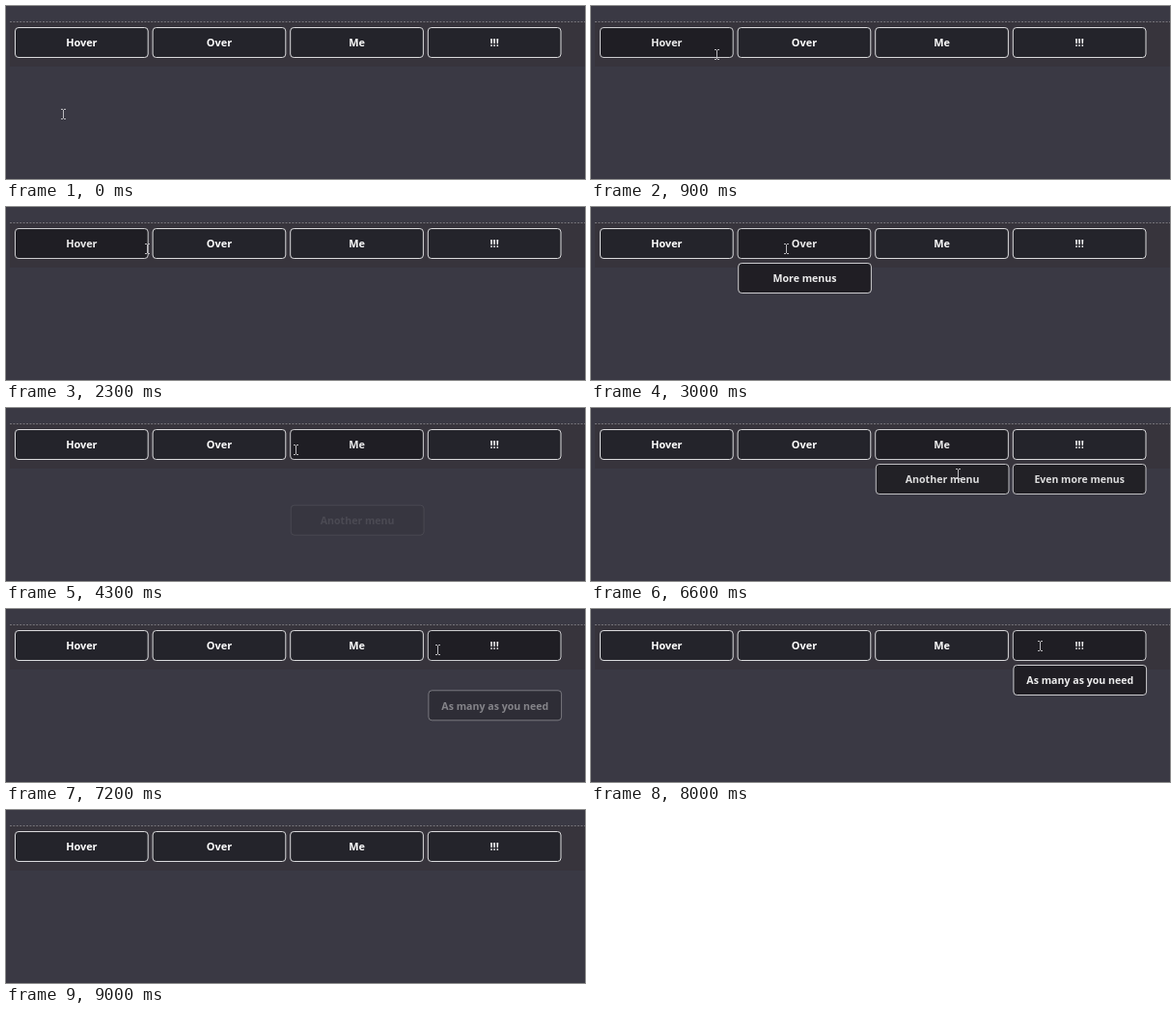
An HTML page with a canvas that plays this animation: 600x180 px, repeating every 9200 ms.

```html
<!DOCTYPE html>
<html lang="en">
<head>
<meta charset="utf-8">
<title>Hover menu</title>
<style>
  html, body { margin: 0; width: 600px; height: 180px; overflow: hidden; background: #3a3944; }
  canvas { display: block; width: 600px; height: 180px; }
</style>
</head>
<body>
<canvas id="stage" width="600" height="180"></canvas>
<script>
const ctx = document.getElementById('stage').getContext('2d');
const LOOP = 9200, STEP = 100, LEAVE = 8200;
const SLIDE = 48, SLIDE_MS = 500, HOVER_ALPHA = 0.92;
const LEFT = 9, PITCH = 142.6, BTN_W = 138.7, BTN_H = 32;
const TOP = 22, SUB_Y = 58, SUB_DX = 0.6;

const menus = [
  { label: 'Hover' },
  { label: 'Over', sub: 'More menus' },
  { label: 'Me', sub: 'Another menu', child: 'Even more menus' },
  { label: '!!!', sub: 'As many as you need' }
];
menus.forEach((m, i) => { m.x = LEFT + i * PITCH; });

// Cursor trips; it rests between them.
const start = { x: 59, y: 112 };
const moves = [
  { from: 0, to: 1000, x: 138, y: 43 },
  { from: 2200, to: 3000, x: 202, y: 43 },
  { from: 3400, to: 4650, x: 338, y: 43 },
  { from: 4900, to: 5200, x: 342, y: 51 },
  { from: 5200, to: 5900, x: 380, y: 68 },
  { from: 6600, to: 7150, x: 447, y: 42 },
  { from: 7200, to: 7500, x: 465, y: 38 },
  { from: 8100, to: LEAVE, x: 470, y: 19 }
];

function cursorAt(t) {
  let { x, y } = start;
  for (const m of moves) {
    if (t <= m.from) break;
    const p = Math.min(1, (t - m.from) / (m.to - m.from));
    x += (m.x - x) * p;
    y += (m.y - y) * p;
  }
  return { x, y };
}

// How long the cursor has been over a menu, or over its submenu only.
function hoverTime(menu, t, subOnly) {
  const top = subOnly ? SUB_Y - 2 : TOP;
  const bottom = menu.sub ? SUB_Y + BTN_H : TOP + BTN_H;
  const inside = s => {
    const { x, y } = cursorAt(s);
    return s < LEAVE && x >= menu.x && x < menu.x + BTN_W && y >= top && y < bottom;
  };
  let s = t;
  while (s > 0 && inside(s)) s -= 5;
  return t - s;
}

// cubic-bezier(.25, .1, .25, 1)
function ease(x) {
  if (x >= 1) return 1;
  const bez = (a, b, s) => 3 * a * s * (1 - s) ** 2 + 3 * b * s * s * (1 - s) + s ** 3;
  let lo = 0, hi = 1;
  for (let i = 0; i < 24; i++) {
    const mid = (lo + hi) / 2;
    if (bez(0.25, 0.25, mid) < x) lo = mid; else hi = mid;
  }
  return bez(0.1, 1, lo);
}

function button(label, x, y, alpha, hovered, size) {
  ctx.globalAlpha = alpha;
  ctx.beginPath();
  ctx.roundRect(x + 0.5, y + 0.5, BTN_W - 1, BTN_H - 1, 3.5);
  ctx.fillStyle = hovered ? '#1e1d22' : '#24242b';
  ctx.fill();
  ctx.strokeStyle = '#dcdcde';
  ctx.lineWidth = 1;
  ctx.stroke();
  ctx.fillStyle = '#fff';
  ctx.font = `bold ${size}px "Open Sans", "Noto Sans", sans-serif`;
  ctx.fillText(label, x + BTN_W / 2, y + 20.2);
  ctx.globalAlpha = 1;
}

function background() {
  ctx.fillStyle = '#3a3944';
  ctx.fillRect(0, 0, 600, 180);
  ctx.fillStyle = '#37343c';
  ctx.fillRect(4, 16, 596, 47);
  ctx.strokeStyle = '#77757b';
  ctx.lineWidth = 1;
  ctx.setLineDash([2, 1.4]);
  ctx.beginPath();
  ctx.moveTo(4, 16.5);
  ctx.lineTo(600, 16.5);
  ctx.stroke();
  ctx.setLineDash([]);
}

function drawMenu(m, t) {
  const held = hoverTime(m, t);
  button(m.label, m.x, TOP, held ? HOVER_ALPHA : 1, held > 0, 10.9);
  if (!held || !m.sub) return;
  const nested = m.child ? hoverTime(m, t, true) : 0;
  const alpha = HOVER_ALPHA * (nested ? HOVER_ALPHA : 1);
  const p = ease(held / SLIDE_MS);
  button(m.sub, m.x + SUB_DX, SUB_Y + SLIDE * (1 - p), alpha * p, true, 10.6);
  if (nested) {
    const q = ease(nested / SLIDE_MS);
    button(m.child, m.x + PITCH + SLIDE * (1 - q), SUB_Y, alpha * q, true, 10.5);
  }
}

function drawCursor(t) {
  if (t > LEAVE) return;
  const pos = cursorAt(t);
  const x = Math.round(pos.x), y = Math.round(pos.y);
  ctx.fillStyle = '#bdbcc0';
  ctx.fillRect(x, y - 4, 1, 9);
  for (const sy of [y - 5, y + 5]) {
    ctx.fillRect(x - 2, sy, 2, 1);
    ctx.fillRect(x + 1, sy, 2, 1);
  }
}

function frame(now) {
  const t = Math.floor((now % LOOP) / STEP) * STEP;
  background();
  ctx.textAlign = 'center';
  menus.forEach(m => drawMenu(m, t));
  drawCursor(t);
  requestAnimationFrame(frame);
}
requestAnimationFrame(frame);
</script>
</body>
</html>
```
